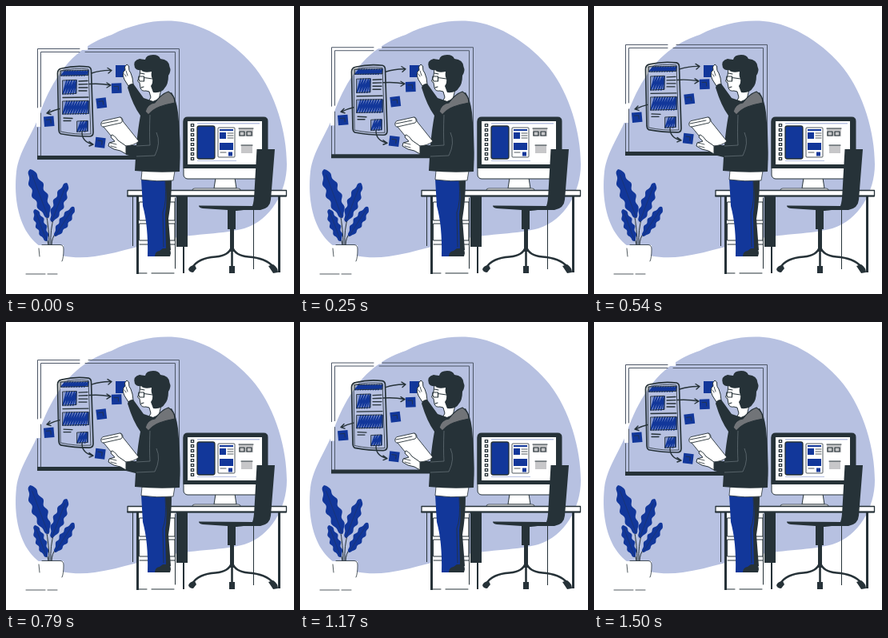
Animation, 360 px wide and 360 px high, one loop 1.54 s. Source, as an HTML page:

```html
<!DOCTYPE html>
<html lang="en">
<head>
<meta charset="utf-8">
<title>Designer at the board</title>
<style>
html, body { margin: 0; width: 100%; height: 100%; overflow: hidden; background: #fff; }
svg { display: block; width: 100vw; height: 100vh; }
.d { fill: #263238; }
.b { fill: #12379a; }
.w { fill: #fff; }
.l { fill: none; stroke: #263238; stroke-linecap: round; stroke-linejoin: round; }
.o { fill: #fff; stroke: #263238; stroke-linejoin: round; }
.h { fill: none; stroke: #12379a; stroke-width: 1.7; stroke-linejoin: round; }
</style>
</head>
<body>
<svg viewBox="0 0 360 360">
  <path fill="#b7c1e1" d="M41 138C51 108 70 72 98 53C109 45 120 40 132 36C158 23 185 17 212 19C250 22 289 49 312 78C337 110 351 158 351 198C351 232 331 268 298 278C272 285 235 285 210 290C175 296 146 308 111 313C75 318 43 309 27 284C14 264 10 235 13 207C16 182 33 160 41 138Z"/>

  <g id="board">
    <path class="w" d="M93 48h9v7h-9zM38 127h5v24h-5z"/>
    <path class="l" stroke-width="1" style="stroke:#4d5767" d="M39.500 127V53.500H92M103 53.500H216.500V188M39.500 152V188M43.500 126V57.500H92M99 57.500H211.500V186M43.500 134V187"/>
    <path class="d" d="M39 187H170V192H39z"/>
    <path class="l" stroke-width="1.700" d="M69.500 78Q86 74 103 76Q106.500 77 106.500 81L109 158Q109 163 104 163Q85 163 70 160Q66.500 160 66 155L64.500 84Q64.500 79 69.500 78Z"/>
    <path class="l" stroke-width=".8" d="M67.500 81Q86 77 103 79L106 160Q86 161 68.500 157Z"/>
    <g id="hatching"></g>
    <path class="l" stroke-width="1.300" d="M91 94l11-.500M91 98l11-.300M91 102h11M91 106h10M71 114.500l32-.500M72 140l11 .500M72 143.500h9"/>
    <path class="l" stroke-width="1.400" d="M107 84Q119 80 132 80.500M127 77.500l5 3-4 3.500M104 97.500Q118 96.500 131 99M126 96l5 3-5 3M67 128.500Q60 130 52 134M55 130l-4 4 5 1.500M95 158Q95 170 109 173M104 169.500l5 3.500-5 2"/>
    <g id="notes"></g>
  </g>

  <g id="plant">
    <path class="l" stroke-width="1" d="M54 299Q54 280 50 258M56 299Q55 279 60 264M53 299Q53 294 50 289M57 299Q57 290 62 284"/>
  </g>
  <path class="w" d="M40 299H72Q73 319 64 334H46Q39 319 40 299Z"/>
  <path class="l" stroke-width=".8" d="M45 298.500H68Q72 299 72 304Q72 315 70 319M41 303L42 313M25 335H49M52 335H64"/>

  <g id="desk">
    <path class="w" d="M163 237H212V334H163z"/>
    <path class="d" d="M163 238h3v97h-3zM158 238h1v62h-1zM213 238h14v63h-14zM221 300h2v34h-2zM340 237h3v96h-3zM309 252h1v77h-1z"/>
    <path class="l" stroke-width="1" d="M167 245H211V268H167ZM167 272H211V293H167ZM167 298H211M165 334H176M182 334H210M211.500 240V328"/>
    <path class="o" stroke-width="1.300" d="M152 230.500H350.500V237.500H152Z"/>
    <path class="l" stroke-width="1.800" d="M152 237.500H350"/>
  </g>

  <g id="monitor">
    <path class="o" d="M262 215H286L288 228H260Z"/>
    <path class="o" stroke-width=".8" d="M233 230Q233 228 236 228H290Q293 228 293 230Z"/>
    <rect class="o" x="222" y="140" width="104.500" height="76" rx="5"/>
    <path class="d" d="M221.500 203V144Q221.500 138.500 227 138.500H322Q327.500 138.500 327.500 144V203Z"/>
    <path class="w" d="M227 144H320V198H227z"/>
    <path fill="#b7c1e1" d="M239 146H317v1.500H239zM239 193H288v1H239z"/>
    <g fill="none" stroke-dasharray="4 2">
      <path stroke="#263238" stroke-width="4.500" d="M233 147V194"/>
      <path stroke="#fff" stroke-width="2" stroke-dasharray="1.500 4.500" stroke-dashoffset="-1.250" d="M233 147V194"/>
    </g>
    <rect class="b" x="239" y="150" width="22" height="41" rx="2.500" stroke="#263238" stroke-width="1.300"/>
    <rect class="o" x="265" y="152" width="21" height="37" rx="1" stroke-width=".8"/>
    <path class="b" d="M267 154h17v2h-17zM267 158h8v8h-8zM267 171h17v9h-17zM278 182.500h5v5h-5z"/>
    <path class="l" stroke-width=".8" d="M277 159h7M277 162h7M277 165h7M268 183h7"/>
    <path fill="#c7c7c9" d="M291 153h18v10h-18zM294 174h14v10h-14z"/>
    <path class="l" stroke-width="1.200" d="M291 153h18M294 174h14M292 157h6v5h-6zM301 157h6v5h-6z"/>
  </g>

  <g id="chair">
    <path class="d" d="M313.500 179H336L331 242Q330 253 318 255H297Q289 256 287 256V279H277V255L246 253Q241 252 241 249.500L308 250Q310 245 310.500 232Z"/>
    <path class="d" d="M280 278h5v29h-5z"/>
    <path class="l" stroke-width="2.600" d="M282 301Q279 312 262 313.500Q240 315 233 327M283 301Q286 312 303 313.500Q325 315 334 326M282.500 304V326"/>
    <path class="d" d="M228 329q2-5 8-5l2 4-4 5q-5 0-6-4zM328 325l6-2q6 4 6 10l-6 1zM279 325h7v9h-7z"/>
  </g>

  <g id="person">
    <path class="d" d="M196 217H207Q207 242 203 266L206 305H197Z"/>
    <path class="b" d="M169 216H199Q202 242 199 260L200 306L190 313H177Q178 275 171 250Z"/>
    <path class="l" stroke-width=".8" d="M199 219Q201 246 196 258L197 301"/>
    <path class="d" d="M186 313Q186 307 192 306L196 303H205L206 309L205 313Z"/>
    <path class="o" stroke-width=".8" d="M170 206H211L209 218Q188 220 169 217Z"/>
    <path class="b" d="M137 74h15v15h-15z"/>
    <path class="o" stroke-width="1" d="M153 100L148 92Q145 87 147 82L149 80L148.500 76L151 73L153.500 75Q153 81 156 84L158 90L159 98Z"/>
    <path class="l" stroke-width=".8" d="M150 81L152 87M148 85L150 88"/>
    <path class="o" stroke-width="1" d="M168 78L167 87L164.500 94L167 96L168 102Q169 107 175 106L179 107L181 114L177 122L191 117L194 104L190 80Z"/>
    <path class="d" d="M161 77Q158 68 167 66Q173 67 174 67Q175 61 184 61Q191 61 193 66Q204 67 204.500 76Q207 81 203 87Q203 98 198 103Q195 109 184 108L181 100Q184 96 183 91Q181 88 182 82Q172 84 169 80Q164 81 161 77Z"/>
    <path class="l" stroke-width="1.200" d="M166 88H172.500V94H167Q165 91 166 88ZM172.500 89.500L183 91M168 84L173 85M169 102L172 101"/>
    <path class="d" d="M152 102Q153 97 159 97L172 115L184 119L207 108Q213 117 215 133Q219 171 217 207Q190 209 161 206L162 189L150 186Q148 180 151 174H163Q165 153 168 137Q159 125 152 102Z"/>
    <path fill="#717478" stroke="#263238" stroke-width="1.200" d="M174 132Q177 122 186 121Q194 110 203 107Q211 112 211 121Q200 123 192 126Q184 129 178 136Z"/>
    <path fill="none" stroke="#78848a" stroke-width=".6" d="M180 136Q179 160 180 174M188 158Q194 171 186 187L163 188M163 175L180 174"/>
    <path class="o" stroke-width=".9" d="M122 151Q118 151 119 146Q120 143 124 143L142 139Q146 139 146 144L166 169Q160 175 147 175L136 168Z"/>
    <path class="l" stroke-width=".9" d="M122 151L144 146Q147 143 143 139M120 147L140 143"/>
    <path class="o" stroke-width="1" d="M150 175L140 168Q135 161 132 161L131 164L136 169L129 171L128 175L135 179L143 181L150 185Z"/>
    <path class="l" stroke-width=".8" d="M130 171L138 173M131 175L138 177"/>
  </g>
</svg>
<script>
const LOOP = 1540;
const byId = id => document.getElementById(id);

function add(parent, cls, d, attrs = {}) {
  const path = document.createElementNS("http://www.w3.org/2000/svg", "path");
  path.setAttribute("class", cls);
  path.setAttribute("d", d);
  for (const key in attrs) path.setAttribute(key, attrs[key]);
  byId(parent).append(path);
}

// A scribbled block: a pen outline filled with slanted strokes.
function scribble(x, y, w, h) {
  add("hatching", "b", `M${x} ${y}h${w}v${h}h${-w}z`, { "fill-opacity": .3 });
  let d = `M${x} ${y + h}`;
  for (let i = 0; i < w; i += 3.2) {
    d += `L${Math.min(x + w, x + i + 5)} ${y}L${x + i} ${y + h}`;
  }
  add("hatching", "h", d);
  add("hatching", "l", `M${x} ${y}l${w}-.6v${h}l${-w} .8z`, { "stroke-width": .9 });
}

function note(x, y, size, angle) {
  const turn = { transform: `rotate(${angle} ${x + size / 2} ${y + size / 2})` };
  add("notes", "b", `M${x} ${y}h${size}v${size}h${-size}z`, turn);
  add("notes", "l", `M${x + 3} ${y + 4}h${size - 7}v${size - 8}`, { ...turn, "stroke-width": .7 });
}

// A scalloped leaf from its tip to its base.
function leaf(tipX, tipY, baseX, baseY, width) {
  const dx = baseX - tipX, dy = baseY - tipY, len = Math.hypot(dx, dy);
  const edge = side => Array.from({ length: 41 }, (_, i) => {
    const u = i / 40;
    const r = side * width * Math.sin(Math.PI * u) ** .5 * (.84 + .16 * Math.sin(u * 26 + side));
    return [tipX + dx * u - dy / len * r, tipY + dy * u + dx / len * r];
  });
  add("plant", "b", "M" + [...edge(1), ...edge(-1).reverse()].join("L") + "Z");
  add("plant", "l", `M${tipX + dx * .12} ${tipY + dy * .12}L${baseX} ${baseY}`,
    { "stroke-width": .6, "stroke-opacity": .6 });
}

scribble(69, 81, 34, 6);
scribble(71, 93, 17, 17);
scribble(71, 119, 32, 16);
scribble(89, 144, 13, 13);

note(132, 96.5, 12.5, -2);
note(113, 115, 12.5, -7);
note(47.5, 138, 12.5, -5);
note(111.5, 164.5, 12.5, 7);

leaf(30, 204, 53, 265, 10);
leaf(76, 221, 57, 270, 8);
leaf(36, 254, 51, 294, 7);
leaf(85, 251, 61, 288, 7);

function draw(now) {
  const phase = 2 * Math.PI * (now % LOOP + 30) / LOOP;
  byId("board").setAttribute("transform", `translate(0 ${3 * Math.cos(phase) - 3})`);
  requestAnimationFrame(draw);
}
draw(performance.now());
</script>
</body>
</html>
```
